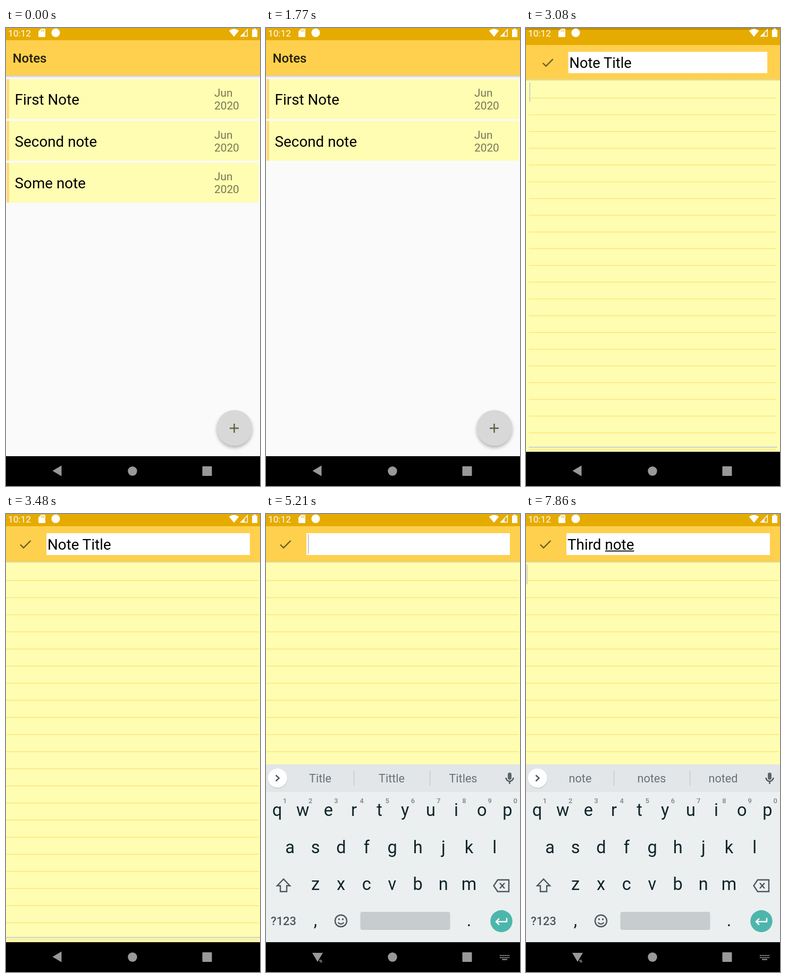
Write an HTML page that moves like this. It is 478 by 860 pixels and loops after 8000 ms.

```html
<!DOCTYPE html>
<html lang="en">
<head>
<meta charset="utf-8">
<title>Notes app</title>
<style>
  html, body { margin: 0; width: 100%; height: 100%; overflow: hidden; background: #000; }
  svg { display: block; width: 478px; height: 860px; }
  text { font-family: Roboto, sans-serif; white-space: pre; }
  .mid { text-anchor: middle; }
  .head { font-size: 27.8px; }
  .date { font-size: 20.8px; fill: #000; fill-opacity: .53; }
  .key { font-size: 32.5px; fill: #10242a; }
  .hint { font-size: 13px; font-weight: 500; fill: #7b8589; }
  .sug { font-size: 21.6px; fill: #687276; }
  .line { fill: none; stroke: #4b575c; stroke-width: 2.4; }
</style>
</head>
<body>
<svg viewBox="0 0 478 860">
  <defs>
    <linearGradient id="fade" x2="0" y2="1">
      <stop stop-color="#000" stop-opacity=".2"/>
      <stop offset="1" stop-color="#000" stop-opacity="0"/>
    </linearGradient>
    <filter id="blur" x="-30%" y="-30%" width="160%" height="160%">
      <feGaussianBlur stdDeviation="3.5"/>
    </filter>
  </defs>

  <g id="list">
    <rect width="478" height="860" fill="#fafafa"/>
    <rect width="478" height="23" fill="#e6ab00"/>
    <rect y="23" width="478" height="66" fill="#ffd04d"/>
    <rect y="89" width="478" height="5" fill="url(#fade)"/>
    <text x="12.5" y="65" font-size="24" font-weight="500" fill="#221d0c">Notes</text>
    <g id="rows"></g>
    <circle cx="430" cy="755" r="33" opacity=".3" filter="url(#blur)"/>
    <circle cx="430" cy="751" r="33.5" fill="#d8d8d8"/>
    <circle id="ripple" cx="430" cy="751" r="0" fill="#fff" opacity=".35"/>
    <path d="M421 751.5h17M429.5 743v17" stroke="#636040" stroke-width="2.5"/>
    <rect y="804" width="478" height="56"/>
  </g>

  <g id="editor">
    <rect x="-5.5" y="-20" width="489" height="14" opacity=".16"/>
    <rect x="-5.5" y="-6" width="489" height="30" fill="#e6ab00"/>
    <rect x="-5.5" y="23" width="489" height="66" fill="#ffd04d"/>
    <rect x="-5.5" y="89" width="489" height="716" fill="#fefdb1"/>
    <rect x="-5.5" y="89" width="489" height="3" fill="url(#fade)"/>
    <g id="rules" fill="#ffc83c" opacity=".6"></g>
    <rect y="794" width="478" height="2.5" fill="#d5d5d0"/>
    <rect x="-5.5" y="804" width="489" height="62"/>
    <path d="M27 57.5l6 6L46.5 50" fill="none" stroke="#6c5b25" stroke-width="2.4"/>
    <rect x="76" y="36" width="383" height="41" fill="#fff"/>
    <text id="title" class="head" x="78" y="67"></text>
    <rect id="under" y="68.6" height="1.8"/>
    <rect id="caret" y="38" width="2.2" height="37" fill="#cdcdcd"/>
    <path id="handle" d="M199 76.500l7.500 6a11.500 11.500 0 1 1-15 0z" fill="#d6d6d8"/>
    <rect id="bodyCaret" x=".8" y="95" width="2.2" height="37" fill="#d3d3c8"/>
  </g>

  <g id="board">
    <rect y="470" width="478" height="334" fill="#ebefef"/>
    <rect y="470" width="478" height="52" fill="#e2e6e9"/>
    <circle cx="22" cy="497.500" r="18" opacity=".14"/>
    <circle cx="21.700" cy="496" r="18" fill="#fff"/>
    <path class="line" d="M18.500 490.500l6 5.500-6 5.500"/>
    <path d="M165.500 482v28M308.500 482v28" stroke="#c5cacd" stroke-width="1.500"/>
    <g id="sugs"></g>
    <rect x="455" y="485.500" width="7" height="13.500" rx="3.500" fill="#5a666a"/>
    <path class="line" d="M451.500 495a7 7 0 0 0 14 0M458.500 502v5" stroke-width="2"/>
    <g id="keys"></g>
    <path class="line" d="M33 685.500l-12 12.500h6v11h12v-11h6z"/>
    <path class="line" d="M436 687h21v22h-21l-7.500-11zM440 693l9 10m0-10l-9 10"/>
    <text class="mid" x="33" y="772" font-size="21.800" font-weight="500" fill="#4b575c">?123</text>
    <g class="line">
      <circle cx="141" cy="764" r="11"/>
      <path d="M135.500 767q5.500 6 11 0"/>
    </g>
    <path d="M136 761h3m4 0h3" stroke="#4b575c" stroke-width="3"/>
    <rect x="177.500" y="747" width="169" height="34" rx="4" fill="#c7cccf"/>
    <circle cx="443" cy="764.500" r="20.700" fill="#4db6ac"/>
    <path d="M453 758.500v7h-20m6-6l-6 6 6 6" fill="none" stroke="#fff" stroke-width="2.400"/>
  </g>

  <g fill="#fff" fill-opacity=".6">
    <g id="back"><path d="M87.500 831.500l17-10v20z"/></g>
    <circle cx="238" cy="832" r="8.700"/>
    <rect x="369.500" y="823" width="18" height="18" rx="1"/>
    <g id="imeIcons">
      <path d="M100 837.500h5v1.400h-5zM101 840h5v1.400h-5z"/>
      <path d="M440 829h18M440 833h18" stroke="#fff" stroke-opacity=".6" stroke-width="2.200" stroke-dasharray="2.200 1"/>
      <rect x="444" y="835.500" width="10" height="2"/>
    </g>
  </g>

  <g fill="#fff">
    <text x="4" y="15.500" font-size="17.200">10:12</text>
    <path d="M66 1.500h7q1 0 1 1v13.500q0 1-1 1h-11q-1 0-1-1v-9.500z"/>
    <path d="M66.500 3.500v3.500m2.500-3.500v3.500m2.500-3.500v3.500" stroke="#e6ab00"/>
    <circle cx="93.500" cy="9" r="8"/>
    <path d="M429 16.500l-9.300-11.500q9.300-7 18.600 0z"/>
    <path d="M454.300 3v12.500h-12.500z" fill="none" stroke="#fff" stroke-width="1.400"/>
    <path d="M441 16l8-8v8z"/>
    <path d="M466 1h4v2h3v14h-10v-14h3z"/>
  </g>
</svg>

<script>
const $ = id => document.getElementById(id);
const LOOP = 8000;
const text = (cls, x, y, s) => `<text class="${cls}" x="${x}" y="${y}">${s}</text>`;

// Static parts
$('rows').innerHTML = ['First Note', 'Second note', 'Some note'].map((name, i) => `
  <g transform="translate(0 ${i * 78.5})">
    <rect x="1" y="96" width="475" height="74.5" fill="#fefdb1"/>
    <rect x="1" y="96" width="5" height="74.500" fill="#ffda7c"/>
    ${text('head', 16.6, 144, name)}${text('date', 392, 129, 'Jun')}${text('date', 392, 153, '2020')}
  </g>`).join('');

$('rules').innerHTML = Array.from({ length: 22 }, (_, i) =>
  `<rect y="${124.4 + i * 32.13}" width="476" height="1.1"/>`).join('');

const keyRow = (chars, x, y) =>
  [...chars].map((c, i) => text('key mid', x + i * 48.15, y, c)).join('');
$('keys').innerHTML =
  keyRow('qwertyuiop', 21, 567) + keyRow('asdfghjkl', 45, 637) + keyRow('zxcvbnm', 93, 706) +
  text('key mid', 93, 774, ',') + text('key mid', 382, 774, '.') +
  [...'1234567890'].map((c, i) => text('hint mid', 35.5 + i * 48.2, 543, c)).join('');

$('sugs').innerHTML = [102, 236.5, 371].map(x => text('sug mid', x, 504, '')).join('');
const sugs = [...$('sugs').children];

// Step tables: [start ms, value]
const swipe = [[0, 0], [1450, -14], [1530, -70], [1610, -160], [1690, -268], [1770, -480]];
const ripple = [[0, 0], [2860, 20], [2930, 33.5]];
const open = [[0, 0], [3005, .13], [3080, .853], [3160, .955], [3240, .99], [3320, 1]];
const slide = [[0, 80], [3950, 66], [4030, 34], [4110, 9], [4190, 0]];
const boardFade = [[0, 0], [3950, .25], [4030, .7], [4110, .95], [4190, 1]];
const turn = [[0, 0], [3870, 40], [3950, 110], [4030, 180], [4110, 245], [4190, 270]];
const caretOn = [[0, 0], [3790, 1], [4350, 0], [4500, 1], [5750, 0], [5900, 1], [7550, 0]];
const bodyCaretOn = [[0, 1], [3480, 0], [7860, 1]];
const handleOn = [[0, 0], [3790, 1], [4500, 0]];

// Finished text, then the underlined word being typed
const typed = [
  [0, ['Note Title', '']], [3870, ['Note ', 'Title']], [4580, ['Note ', 'Titl']],
  [4970, ['Note ', 'Ti']], [5050, ['', 'Note']], [5130, ['', 'No']], [5210, ['', '']],
  [5900, ['', 'T']], [6140, ['', 'Th']], [6230, ['', 'Thir']], [6450, ['', 'Third']],
  [6530, ['Third ', '']], [6610, ['Third ', 'n']], [6840, ['Third ', 'no']],
  [6920, ['Third ', 'not']], [7080, ['Third ', 'note']]
];
const offers = [
  [0, 'Title Tittle Titles'], [5980, 'The This That'], [6140, 'The That This'],
  [6230, 'Third Thirty This'], [6450, 'Third Third-party This'], [6530, 'party one time'],
  [6610, 'not no now'], [6840, 'no not now'], [6920, 'not note nothing'],
  [7080, 'note notes noted']
];

const at = (steps, t) => steps.findLast(s => s[0] <= t)[1];
const set = (id, attrs) => {
  for (const k in attrs) $(id).setAttribute(k, attrs[k]);
};
const zoom = s => `translate(239 430) scale(${s}) translate(-239 -430)`;

const pen = document.createElement('canvas').getContext('2d');
const widthOf = s => {
  pen.font = '27.8px Roboto, sans-serif';
  return pen.measureText(s).width;
};

function draw(t) {
  $('rows').lastElementChild.setAttribute('transform', `translate(${at(swipe, t)} 157)`);
  set('ripple', { r: at(ripple, t) });

  const p = at(open, t);
  set('list', { transform: zoom(1 + .05 * p), visibility: p < 1 ? 'visible' : 'hidden' });
  set('editor', { transform: zoom(.85 + .15 * p), opacity: p > .5 ? 1 : 0 });

  const [done, word] = at(typed, t);
  const from = widthOf(done), end = widthOf(done + word);
  $('title').textContent = done + word;
  set('under', { x: 78.5 + from, width: Math.max(0, end - from - .5) });
  set('caret', { x: 78.8 + Math.max(0, end - 1), opacity: at(caretOn, t) });
  set('handle', { opacity: at(handleOn, t) });
  set('bodyCaret', { opacity: at(bodyCaretOn, t) });

  const shown = at(boardFade, t);
  set('board', { transform: `translate(0 ${at(slide, t)})`, opacity: shown });
  set('imeIcons', { opacity: shown });
  set('back', { transform: `rotate(${at(turn, t)} 97 831.5)` });
  at(offers, t).split(' ').forEach((s, i) => sugs[i].textContent = s);
}

const start = performance.now();
function tick() {
  draw((performance.now() - start) % LOOP);
  requestAnimationFrame(tick);
}
tick();
</script>
</body>
</html>
```
